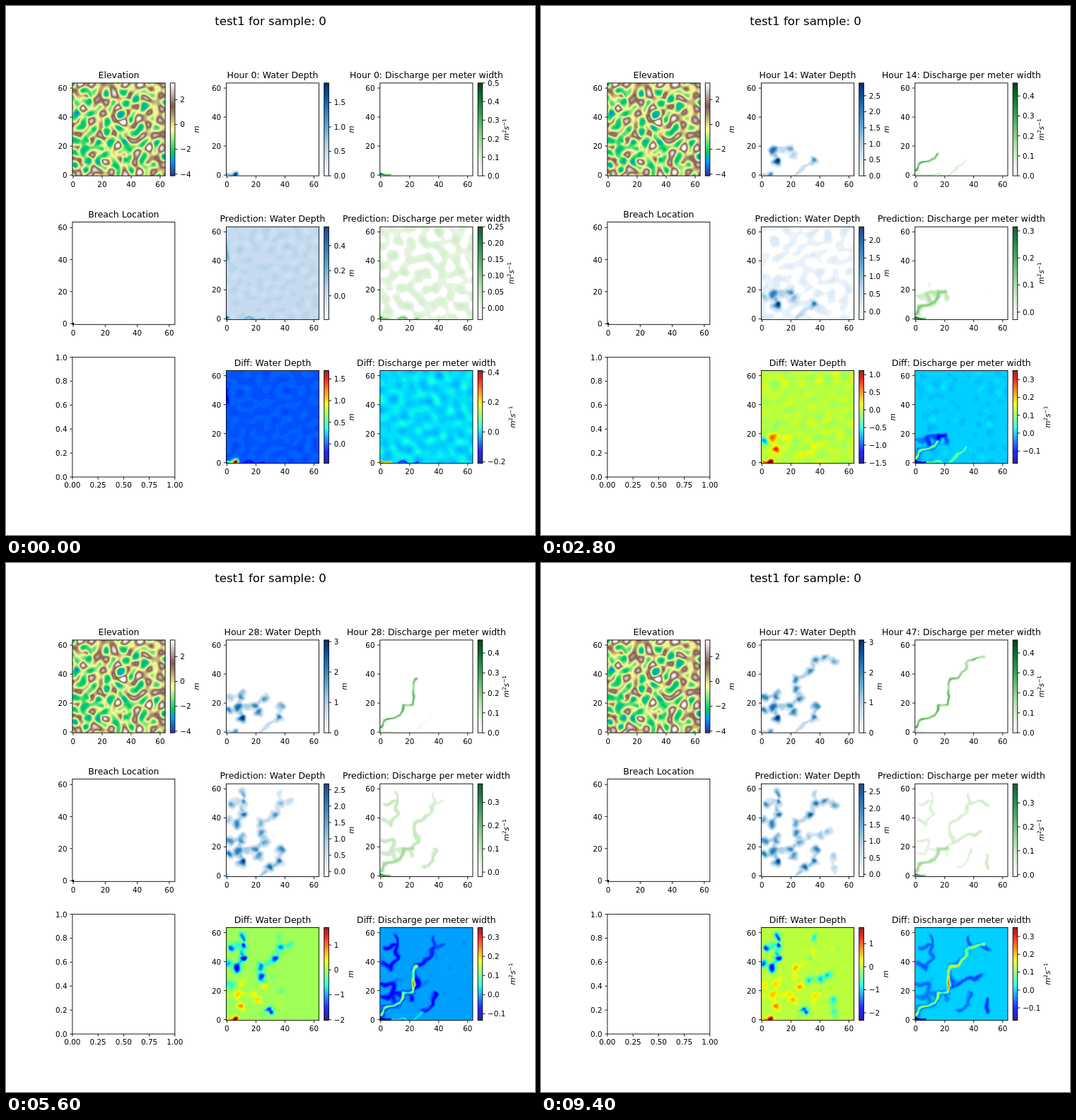
An HTML page with a canvas for the animation above (9.6 s loop, 748x748 px).

```html
<!DOCTYPE html>
<html lang="en">
<head>
<meta charset="utf-8">
<title>Flood simulation panels</title>
<style>
html, body { margin: 0; width: 100%; height: 100%; overflow: hidden; background: #fff; }
canvas { display: block; }
</style>
</head>
<body>
<canvas id="stage" width="748" height="748"></canvas>
<script>
const ctx = document.getElementById('stage').getContext('2d');
const N = 131, CELL = N / 64, SIZE = 131.2;
const COL = [93.9, 311.4, 528.8], ROW = [108.9, 312.2, 515.5];
const HOURS = 48, HOUR_MS = 200;
const clamp = v => Math.max(0, Math.min(1, v));
const ramp = (v, a, b) => clamp((v - a) / (b - a));
const decay = (h, span) => Math.exp(-h / span);
const rise = (h, start) => h > start ? 1 - decay(h - start, 4) : 0;

// Colour maps
const lut = fn => Array.from({ length: 256 }, (_, i) => fn(i / 255));
const gradient = stops => lut(v => {
  let k = 0;
  while (k < stops.length - 2 && v > stops[k + 1][0]) k++;
  const [a, from] = stops[k], [b, to] = stops[k + 1], u = ramp(v, a, b);
  const mix = s => ((from >> s) & 255) * (1 - u) + ((to >> s) & 255) * u;
  return [mix(16), mix(8), mix(0)];
});
const even = colors => gradient(colors.map((c, i) => [i / (colors.length - 1), c]));
const BLUES = even([0xffffff, 0xdeebf7, 0xc6dbef, 0x9ecae1, 0x6baed6, 0x4292c6, 0x2171b5, 0x08519c, 0x08306b]);
const GREENS = even([0xffffff, 0xe5f5e0, 0xc7e9c0, 0xa1d99b, 0x74c476, 0x41ab5d, 0x238b45, 0x006d2c, 0x00441b]);
const TERRAIN = gradient([[0, 0x333399], [.15, 0x0099ff], [.25, 0x00cc66], [.5, 0xffff99], [.75, 0x805c54], [1, 0xffffff]]);
const JET = lut(v => [
  Math.min(ramp(v, .35, .66), 1 - .5 * ramp(v, .89, 1)),
  Math.min(ramp(v, .125, .375), 1 - ramp(v, .64, .91)),
  Math.min(.5 + .5 * ramp(v, 0, .11), 1 - ramp(v, .34, .65))
].map(c => c * 255));

// Basins in the order the flood reaches them, then those only the prediction fills
const WET = [
  [10, 9], [8, 17], [36, 10], [19, 18], [22, 14], [1, 15], [10, 25], [26, 23],
  [37, 18], [2, 24], [24, 30], [23, 36], [33, 42], [37, 50], [43, 51], [50, 49]
];
const DRY = [
  [30, 6], [11, 42], [7, 36], [11, 50], [4, 50], [11, 57], [1, 39], [36, 57],
  [33, 28], [40, 28], [46, 31], [49, 13], [50, 5]
];
const ROUTE = [[0, 3], [2, 8], [8, 9], [13, 11], [16, 18], [22, 19], [23, 24], [23, 36], [29, 38], [33, 42], [37, 50], [47, 51]];
const SIDE_ARM = [[7, 0], [22, 0], [28, 4], [34, 10]];

const basins = [
  ...WET.map((p, i) => ({ p, depth: 2.1 + decay(i, 1), real: 1 + 2.7 * i, guess: 4 + 1.6 * i, share: .85 })),
  ...DRY.map((p, i) => ({ p, depth: 2.3 * decay(i, 12), real: HOURS, guess: 14 + 1.7 * i, share: 1 }))
];
// Each basin is fed by the nearest earlier one, if that is close enough
basins.forEach((b, i) => {
  const gap = q => Math.hypot(q.p[0] - b.p[0], q.p[1] - b.p[1]);
  b.source = basins.slice(0, i).filter(q => gap(q) < 12).sort((q, r) => gap(q) - gap(r))[0];
});

// Smooth random fields
function noise(seed, wavelength) {
  const random = () => (seed = (seed * 16807 + 12345) % 2147483647) / 2147483647;
  const waves = Array.from({ length: 18 }, (_, i) => {
    const angle = (i + random()) * Math.PI / 18, k = 2 * Math.PI / (wavelength * CELL * (.75 + .6 * random()));
    return [k * Math.cos(angle), k * Math.sin(angle), random() * 2 * Math.PI];
  });
  return field().map((_, n) =>
    waves.reduce((sum, [kx, ky, p]) => sum + Math.cos(kx * (n % N) + ky * Math.floor(n / N) + p), 0) / 3);
}

function field() { return new Float32Array(N * N); }

const ripples = [911, 2903, 5701, 8311].map(seed => noise(seed * 7919, 9));
const [bendX, bendY] = [ripples[1], ripples[3]].map(f => f.map(v => .6 * CELL * v));

function addRipples(f, first, h, amount) {
  const c = amount * Math.cos(h / 3), s = amount * Math.sin(h / 3);
  return f.map((v, n) => v + c * ripples[first][n] + s * ripples[first + 1][n]);
}

// Flat-topped spot with an irregular outline
function blob(f, [x, y], r, a) {
  const cx = (x + .5) * CELL - .5, cy = N - .5 - (y + .5) * CELL, s = r * CELL, reach = 2 * s + 3;
  for (let j = Math.max(0, Math.ceil(cy - reach)); j <= Math.min(N - 1, cy + reach); j++)
    for (let i = Math.max(0, Math.ceil(cx - reach)); i <= Math.min(N - 1, cx + reach); i++) {
      const n = j * N + i, d = Math.hypot(i - cx + bendX[n], j - cy + bendY[n]) / s;
      f[n] = Math.max(f[n], a * Math.exp(-(d ** 2.4)));
    }
}

function stream(f, pts, r, a, end = pts.length - 1, taper = 0) {
  const last = pts.length - 1;
  for (let s = 0; s <= Math.min(end, last); s += 1 / 16) {
    const k = Math.min(Math.floor(s), last - 1), [p, q] = [pts[k], pts[k + 1]];
    blob(f, p.map((v, i) => v + (q[i] - v) * (s - k)), r, a * (1 - taper * s / last));
  }
}

function elevation() {
  const mask = field();
  for (const { p, depth } of basins) blob(mask, p, 3.2, Math.min(1, .4 + .22 * depth));
  return noise(777777, 9.5).map((v, n) => (1.3 * v + .3) * (1 - mask[n]) - 2.8 * mask[n]);
}

function waterDepth(h, predicted) {
  const f = field();
  for (const b of basins) {
    const level = b.depth * rise(h, predicted ? b.guess : b.real) * (predicted ? b.share : 1);
    if (!level) continue;
    blob(f, b.p, 2.6, level);
    if (b.source) stream(f, [b.source.p, b.p], 1.5, level * .5);
  }
  const arm = .8 * rise(h, predicted ? 10 : 6);
  if (arm) stream(f, SIDE_ARM.slice(1), 1.1, arm);
  if (!predicted) {
    blob(f, [5, .5], 2.4, 1.9);
    stream(f, [[0, 0], [6, 0]], .9, .9);
    return f;
  }
  const uneven = f.map((v, n) => v * (1 + .13 * ripples[2][n]));
  blob(uneven, [0, 0], 1.2, .5);
  stream(uneven, [[0, 41], [0, 51]], 1, .17 * decay(h, 3));
  stream(uneven, [[13, 0], [25, 0]], 1, .17 * decay(h, 3));
  return addRipples(uneven, 0, h, (.015 + .025 * clamp(h / 9)) * ramp(h, 26, 16));
}

function discharge(h, predicted) {
  const f = field();
  if (!predicted) {
    stream(f, [[0, 0], [6, 0]], .8, .1 + .4 * decay(h, 4), 1, .4);
    if (h > 0) stream(f, ROUTE, 1, .27, .26 * h, .35);
    if (h > 5) stream(f, SIDE_ARM, .7, .1 * ramp(h, 36, 16));
    return f.map((v, n) => v * (1 + .15 * ripples[0][n]));
  }
  for (const b of basins) {
    const flow = .12 * rise(h, b.guess) * decay(h - b.guess, 35);
    if (b.source && flow) stream(f, [b.source.p, b.p], 1.5, flow);
  }
  if (h > 3) stream(f, ROUTE, 1.6, .14, Math.min(5, h / 3), .3);
  stream(f, [[0, 0], [6, 0]], .8, .12 + .24 * clamp(h / 5), 1, .5);
  blob(f, [0, 0], 1, .26);
  stream(f, [[13, 0], [25, 0]], .9, .1 * decay(h, 3));
  return addRipples(f, 2, h, .01 * decay(h, 12));
}

const difference = (a, b) => a.map((v, n) => v - b[n]);

// Colour limits of the panels: real maximum, then prediction and difference ranges
const depthLimits = h => [
  3.08 - 1.18 * decay(h, 7.5),
  [-.28 + .0045 * h + .09 * decay(h, 2), 2.75 - 2.2 * decay(h, 8)],
  [-2.5 + 2.05 * decay(h, 19), 1.7 - .75 * Math.exp(-(((h - 11.5) / 5) ** 2))]
];
const flowLimits = h => [
  .465 + .035 * decay(h, 1),
  [-.036 + .0006 * h, .25 + .13 * ramp(h, 8, 20)],
  [-.15 - .02 * Math.cos((h - 47) / 5) - .08 * decay(h, 2), .35 + .06 * decay(h, 2)]
];

// Drawing
const tile = document.createElement('canvas');
tile.width = tile.height = N;
const tileCtx = tile.getContext('2d');
const pixels = tileCtx.createImageData(N, N);

function text(str, x, y, size, align = 'center') {
  ctx.font = `${size}px "DejaVu Sans", sans-serif`;
  ctx.textAlign = align;
  ctx.fillText(str, x, y);
}

function line(x1, y1, x2, y2) {
  ctx.beginPath();
  ctx.moveTo(x1, y1);
  ctx.lineTo(x2, y2);
  ctx.stroke();
}

function xTick(x, y, label) {
  line(x, y, x, y + 3.6);
  text(label, x, y + 15.4, 10.39);
}

function yTick(x, y, label) {
  line(x, y, x - 3.6, y);
  text(label, x - 7.3, y + 3.9, 10.39, 'right');
}

function mapAxes(x, y, size, title) {
  ctx.strokeRect(x, y, size, size);
  for (let v = 0; v <= 60; v += 20) {
    const p = (v + .5) / 64 * size;
    xTick(x + p, y + size, v);
    yTick(x, y + size - p, v);
  }
  text(title, x + size / 2, Math.floor(y - 6.3), 12.47);
}

function unitLabel(x, y, flow) {
  const parts = flow ? [['m', 0], ['2', 1], ['s', 0], ['−1', 1]] : [['m', 0]];
  const setFont = sup => {
    ctx.font = sup ? '7.27px "DejaVu Sans", sans-serif' : 'italic 10.39px "DejaVu Sans", sans-serif';
  };
  const widths = parts.map(([str, sup]) => (setFont(sup), ctx.measureText(str).width));
  ctx.save();
  ctx.translate(x, y);
  ctx.rotate(-Math.PI / 2);
  ctx.textAlign = 'left';
  let pen = -widths.reduce((a, b) => a + b) / 2;
  parts.forEach(([str, sup], i) => {
    setFont(sup);
    ctx.fillText(str, pen, sup ? -4 : 0);
    pen += widths[i];
  });
  ctx.restore();
}

function colorBar(x, y, map, lo, hi, flow) {
  for (let j = 0; j < N; j++) {
    ctx.fillStyle = `rgb(${map[Math.round((1 - j / (N - 1)) * 255)].map(Math.round)})`;
    ctx.fillRect(x, y + j, 6.6, 1.2);
  }
  ctx.fillStyle = '#000';
  ctx.strokeRect(x, y, 6.6, SIZE);
  const step = [.05, .1, .2, .5, 1, 2].find(s => (hi - lo) / s <= 6);
  const digits = step < .1 ? 2 : step < 1 ? 1 : 0;
  let widest = 0;
  for (let k = Math.ceil(lo / step); k * step <= hi + 1e-6; k++) {
    const ty = y + (hi - k * step) / (hi - lo) * SIZE;
    const label = (k < 0 ? '−' : '') + Math.abs(k * step).toFixed(digits);
    line(x + 6.6, ty, x + 10.2, ty);
    text(label, x + 13.9, ty + 3.9, 10.39, 'left');
    widest = Math.max(widest, ctx.measureText(label).width);
  }
  unitLabel(x + 13.9 + widest + (flow ? 13.6 : 12), y + SIZE / 2, flow);
}

function panel(col, row, title, f, map, [lo, hi], { bands = 255, floor = 0 } = {}) {
  const x = COL[col], y = ROW[row];
  f.forEach((value, n) => {
    const v = clamp((value - lo) / (hi - lo));
    const rgb = map[v < floor ? 0 : Math.round(Math.round(v * bands) / bands * 255)];
    pixels.data.set([...rgb, 255], n * 4);
  });
  tileCtx.putImageData(pixels, 0, 0);
  ctx.drawImage(tile, x, y, SIZE, SIZE);
  mapAxes(x, y, SIZE, title);
  colorBar(x + 138.4, y, map, lo, hi, col === 2);
}

const ground = elevation();

function draw(h) {
  ctx.fillStyle = '#fff';
  ctx.fillRect(0, 0, 748, 748);
  ctx.fillStyle = ctx.strokeStyle = '#000';
  ctx.lineWidth = .9;
  text('test1 for sample: 0', 374, 27, 16.62);

  panel(0, 0, 'Elevation', ground, TERRAIN, [-4.14, 3.34]);
  mapAxes(COL[0], 305.4, 144.9, 'Breach Location');
  ctx.fillRect(COL[0], 448, 2.2, 2.2);
  ctx.strokeRect(COL[0], 496.7, 144.9, 169.3);
  for (let k = 0; k <= 4; k++) xTick(COL[0] + k * 36.225, 666, (k / 4).toFixed(2));
  for (let k = 0; k <= 5; k++) yTick(COL[0], 666 - k * 33.86, (k / 5).toFixed(1));

  [
    ['Water Depth', waterDepth, depthLimits, BLUES, .06, .085],
    ['Discharge per meter width', discharge, flowLimits, GREENS, .04, .115]
  ].forEach(([name, simulate, limits, map, realFloor, guessFloor], i) => {
    const [top, guessRange, diffRange] = limits(h);
    const real = simulate(h, false), guess = simulate(h, true);
    panel(i + 1, 0, `Hour ${h}: ${name}`, real, map, [0, top], { floor: realFloor });
    panel(i + 1, 1, `Prediction: ${name}`, guess, map, guessRange, { bands: 24, floor: guessFloor });
    panel(i + 1, 2, `Diff: ${name}`, difference(real, guess), JET, diffRange, { bands: 64 });
  });
}

let shown = -1;
function tick() {
  const hour = Math.floor(performance.now() / HOUR_MS) % HOURS;
  if (hour !== shown) draw(shown = hour);
  requestAnimationFrame(tick);
}
tick();
</script>
</body>
</html>
```
